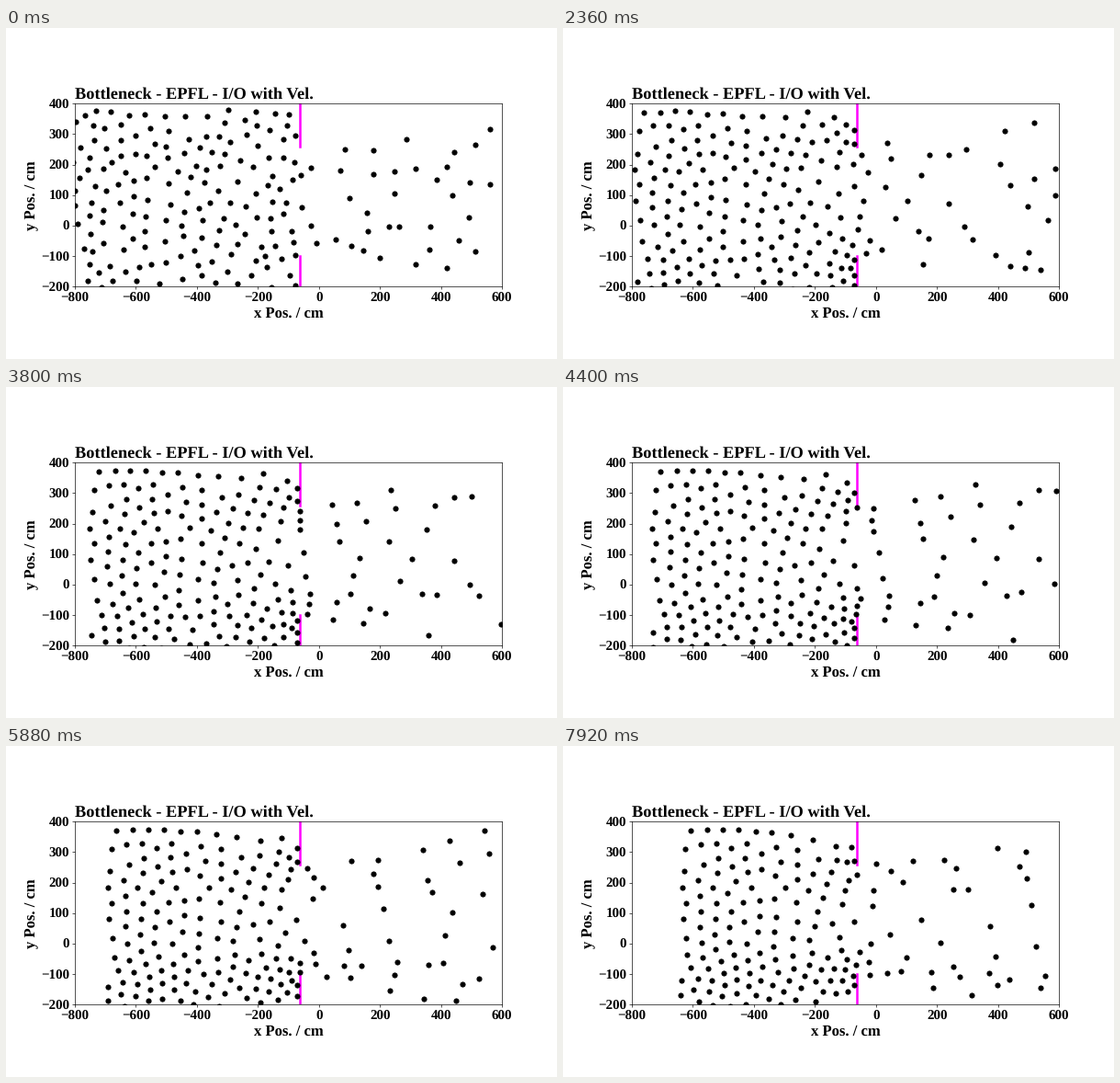
Animation, 600 px wide and 360 px high, one loop 8000 ms. Source, as a matplotlib script:

```python
import numpy as np
import matplotlib.pyplot as plt
from matplotlib.animation import FuncAnimation

TICKS, TICK_MS = 200, 40
STEPS, DT = 129, 0.062          # recorded positions and seconds between them
WALL_X, GAP_LOW, GAP_HIGH = -61, -100, 260
GAP_MID = (GAP_LOW + GAP_HIGH) / 2
FREE_SPEED, GAP_SPEED, QUEUE_SPEED = 145, 62, 28    # cm/s
REACH = 56                                          # cm
FAN = 1300                                          # larger: narrower outflow

rng = np.random.default_rng(4)


def spread(sample, count, tries):
    """Scatter points evenly: keep the most isolated of several candidates."""
    points = [sample()]
    while len(points) < count:
        cand = np.array([sample() for _ in range(tries)])
        gaps = np.linalg.norm(cand[:, None] - np.array(points), axis=2)
        points.append(cand[gaps.min(axis=1).argmax()])
    return np.array(points)


def in_queue():
    return rng.uniform((-860, -320), (WALL_X - 12, 382))


def in_outflow():
    ahead = 660 * rng.random() ** 1.25
    half = 165 * (1 + ahead / FAN)
    return np.array([WALL_X + ahead, GAP_MID + rng.uniform(-half, half)])


def walking(pos, sway):
    """Undisturbed velocity: shuffle to the gap, then fan out and speed up."""
    x, y = pos.T
    dx = np.maximum(WALL_X + 25 - x, 1)
    dy = np.clip(y, GAP_LOW + 65, GAP_HIGH - 65) - y
    dist = np.hypot(dx, dy)
    speed = QUEUE_SPEED + (GAP_SPEED - QUEUE_SPEED) * np.exp(-dist / 100)
    steer = np.exp(-dx / 150)
    edge = 0.09 * np.maximum(-60 - y, 0) - 0.5 * np.maximum(y - 372, 0)
    queue = np.column_stack([speed * dx / np.hypot(dx, dy * steer),
                             speed * steer * dy / dist + edge])

    ahead = np.maximum(x - WALL_X, 0)
    speed = FREE_SPEED - (FREE_SPEED - GAP_SPEED) * np.exp(-ahead / 60)
    slope = (y - GAP_MID) / (ahead + FAN) + sway
    fan = np.column_stack([speed, speed * slope])
    return np.where((x < WALL_X)[:, None], queue, fan)


def repulsion(pos):
    diff = pos[:, None] - pos
    dist = np.linalg.norm(diff, axis=2) + 1e-9
    push = 100 * np.clip(1 - dist / REACH, 0, None) ** 2 / dist
    return (diff * push[..., None]).sum(axis=1)


def simulate(pos, substeps=2):
    sway = rng.normal(0, 0.06, len(pos))
    track = [pos]
    for _ in range(STEPS - 1):
        for _ in range(substeps):
            new = pos + (walking(pos, sway) + repulsion(pos)) * DT / substeps
            outside = (new[:, 1] < GAP_LOW) | (new[:, 1] > GAP_HIGH)
            blocked = (pos[:, 0] < WALL_X) & outside
            new[blocked, 0] = np.minimum(new[blocked, 0], WALL_X - 10)
            pos = new
        track.append(pos)
    return track


track = simulate(np.vstack([spread(in_queue, 205, 20), spread(in_outflow, 37, 6)]))

plt.rcParams.update({
    "font.family": "Liberation Serif", "font.weight": "bold",
    "axes.titleweight": "bold", "axes.labelweight": "bold",
    "axes.titlesize": 22, "axes.labelsize": 20,
    "xtick.labelsize": 18, "ytick.labelsize": 18, "text.hinting": "none"})

fig, ax = plt.subplots(figsize=(10, 6), dpi=60)
ax.set_aspect("equal")
ax.set(xlim=(-800, 600), ylim=(-200, 400),
       xticks=range(-800, 601, 200), yticks=range(-200, 401, 100))
ax.set_xlabel("x Pos. / cm", labelpad=2.8)
ax.set_ylabel("y Pos. / cm")
ax.set_title("Bottleneck - EPFL - I/O with Vel.", loc="left")
for ends in ((GAP_HIGH, 400), (-200, GAP_LOW)):
    ax.plot([WALL_X, WALL_X], ends, color="magenta", lw=3)
dots, = ax.plot([], [], "o", color="black", ms=6.3)


def update(tick):
    dots.set_data(*track[int(0.645 * tick + 0.3)].T)
    return dots,


anim = FuncAnimation(fig, update, frames=TICKS, interval=TICK_MS, repeat=True, repeat_delay=0)
plt.show()
```
